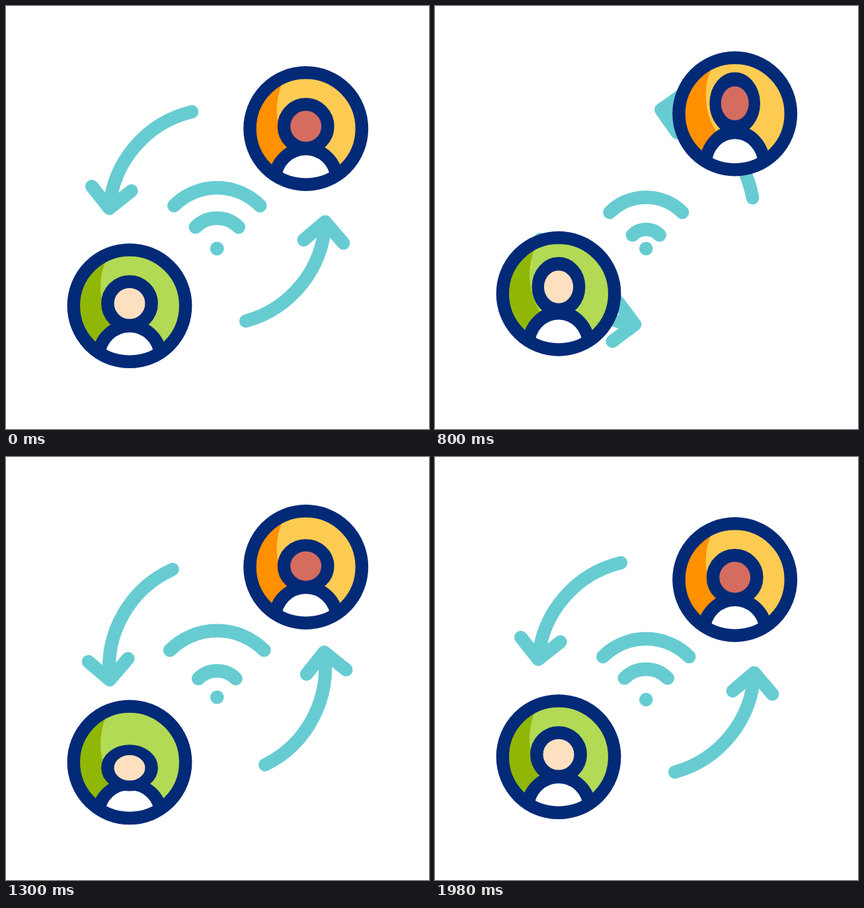
An HTML page with a canvas that plays this animation: 640 px wide and 640 px high, repeating every 2.16 s.

```html
<!DOCTYPE html>
<html lang="en">
<head>
<meta charset="utf-8">
<title>Wireless exchange</title>
<style>
  html, body { margin: 0; width: 100%; height: 100%; overflow: hidden; background: #fff; }
  canvas { display: block; width: 100vmin; height: 100vmin; }
</style>
</head>
<body>
<canvas id="stage" width="640" height="640"></canvas>
<script>
const ctx = document.getElementById('stage').getContext('2d');
const LOOP = 2160, STEP = 20, BEGIN = 180, END = 1980;
const NAVY = '#032a77', TEAL = '#67ccd2';
const RAD = Math.PI / 180;

function bezier(x1, y1, x2, y2) {
  const at = (a, b, s) => 3 * (1 - s) * s * ((1 - s) * a + s * b) + s * s * s;
  return x => {
    let lo = 0, hi = 1;
    for (let i = 0; i < 24; i++) {
      const mid = (lo + hi) / 2;
      if (at(x1, x2, mid) < x) lo = mid; else hi = mid;
    }
    return at(y1, y2, lo);
  };
}

const clamp = u => Math.min(1, Math.max(0, u));
const part = (t, from, to) => clamp((t - from) / (to - from));

const swingEase = bezier(.35, 0, .35, 1);
const launch = bezier(.25, .3, .57, 1);
const settle = bezier(.25, 0, .25, 1);

// Eases from one turning point [time, value] to the next.
function swing(points, t) {
  let value = points[0][1];
  for (let i = 1; i < points.length; i++) {
    const [from, a] = points[i - 1], [to, b] = points[i];
    value += (b - a) * swingEase(part(t, from, to));
  }
  return value;
}

const bob = t => swing([[BEGIN, 0], [300, 21], [820, -22.5], [1085, 28], [1300, -19], [1500, 12], [1840, 0]], t);
const nod = t => swing([[BEGIN, 0], [440, 4], [930, -13.5], [1160, 12], [1390, 0]], t);
const hop = t => swing([[BEGIN, 0], [520, 2], [800, 0], [980, 27], [1300, -3.5], [1800, 0]], t);
const spin = t => 373 * launch(part(t, BEGIN, 1380)) - 13 * settle(part(t, 1380, END));

// Waves start from rest, run at one speed, and the last two slow to rest.
const SPEED = .241, GAP = 46, REACH = 114;
function waveRadii(t) {
  const run = Math.max(0, t - BEGIN);
  const radii = [0, 1, 2].map(i => i * GAP + SPEED * run * run / (run + 109));
  for (let i = 0; i < 3; i++) radii.push(SPEED * (t - 478 - 202 * i));
  [1140, 1373].forEach((birth, i) => {
    if (t > birth) radii.push((2 - i) * GAP * (1 - (1 - part(t, birth, END)) ** 2.7));
  });
  return radii.filter(r => r >= 0 && r < REACH);
}

function disk(x, y, r, fill) {
  ctx.beginPath();
  ctx.arc(x, y, r, 0, 2 * Math.PI);
  ctx.fillStyle = fill;
  ctx.fill();
}

function ring(x, y, r, fill) {
  if (fill) disk(x, y, r, fill);
  ctx.beginPath();
  ctx.arc(x, y, r, 0, 2 * Math.PI);
  ctx.strokeStyle = NAVY;
  ctx.lineWidth = 19.5;
  ctx.stroke();
}

function drawSignal(t) {
  ctx.save();
  ctx.translate(319.3, 367 + hop(t));
  ctx.strokeStyle = TEAL;
  for (const r of waveRadii(t)) {
    ctx.lineWidth = 20.5 * clamp((REACH - r) / 7);
    ctx.beginPath();
    ctx.arc(0, 0, r, -135 * RAD, -45 * RAD);
    ctx.stroke();
  }
  disk(0, 0, 10.3, TEAL);
  ctx.restore();
}

function drawArrow(angle) {
  const r = 163.6;
  const barb = a => [r + 42.5 * Math.cos(a * RAD), 42.5 * Math.sin(a * RAD)];
  ctx.save();
  ctx.translate(319.5, 319);
  ctx.rotate(angle * RAD);
  ctx.strokeStyle = TEAL;
  ctx.lineWidth = 20;
  ctx.beginPath();
  ctx.arc(0, 0, r, 0, 72 * RAD);
  ctx.moveTo(...barb(47));
  ctx.lineTo(r, 0);
  ctx.lineTo(...barb(137));
  ctx.stroke();
  ctx.restore();
}

function drawUser(x, y, t, [dark, light, face]) {
  const dip = nod(t), up = Math.max(0, -dip), down = Math.max(0, dip);
  ctx.save();
  ctx.translate(x, y + bob(t));

  ctx.save();
  ctx.beginPath();
  ctx.arc(0, 0, 84.7, 0, 2 * Math.PI);
  ctx.clip();
  ctx.fillStyle = dark;
  ctx.fillRect(-90, -90, 180, 180);
  disk(61, -28, 105, light);

  // Shoulders
  ctx.translate(0, 77);
  ctx.scale(1 - up * .004, 1 - dip * .0043);
  ring(0, 0, 46.5, '#fff');
  ctx.restore();

  // Head
  ctx.save();
  ctx.translate(0, dip - 3.5);
  ctx.scale(1 - up * .0088, 1 + up * .0077 - .0317 * down ** .7);
  ring(0, 0, 33.2, face);
  ctx.restore();

  ring(0, 0, 84.7);
  ctx.restore();
}

function draw(t) {
  ctx.fillStyle = '#fff';
  ctx.fillRect(0, 0, 640, 640);
  ctx.lineCap = ctx.lineJoin = 'round';
  const turn = spin(t);
  drawSignal(t);
  drawArrow(184.5 - turn);
  drawArrow(2.6 - turn);
  drawUser(453.7, 185.5, t, ['#ff9000', '#fdcb52', '#d56c60']);
  drawUser(187, 453.6, t - 140, ['#90b706', '#b2da54', '#fde0bf']);
}

const start = performance.now();
function tick() {
  const t = (performance.now() - start) % LOOP;
  draw(Math.floor(t / STEP) * STEP);
  requestAnimationFrame(tick);
}
tick();
</script>
</body>
</html>
```
